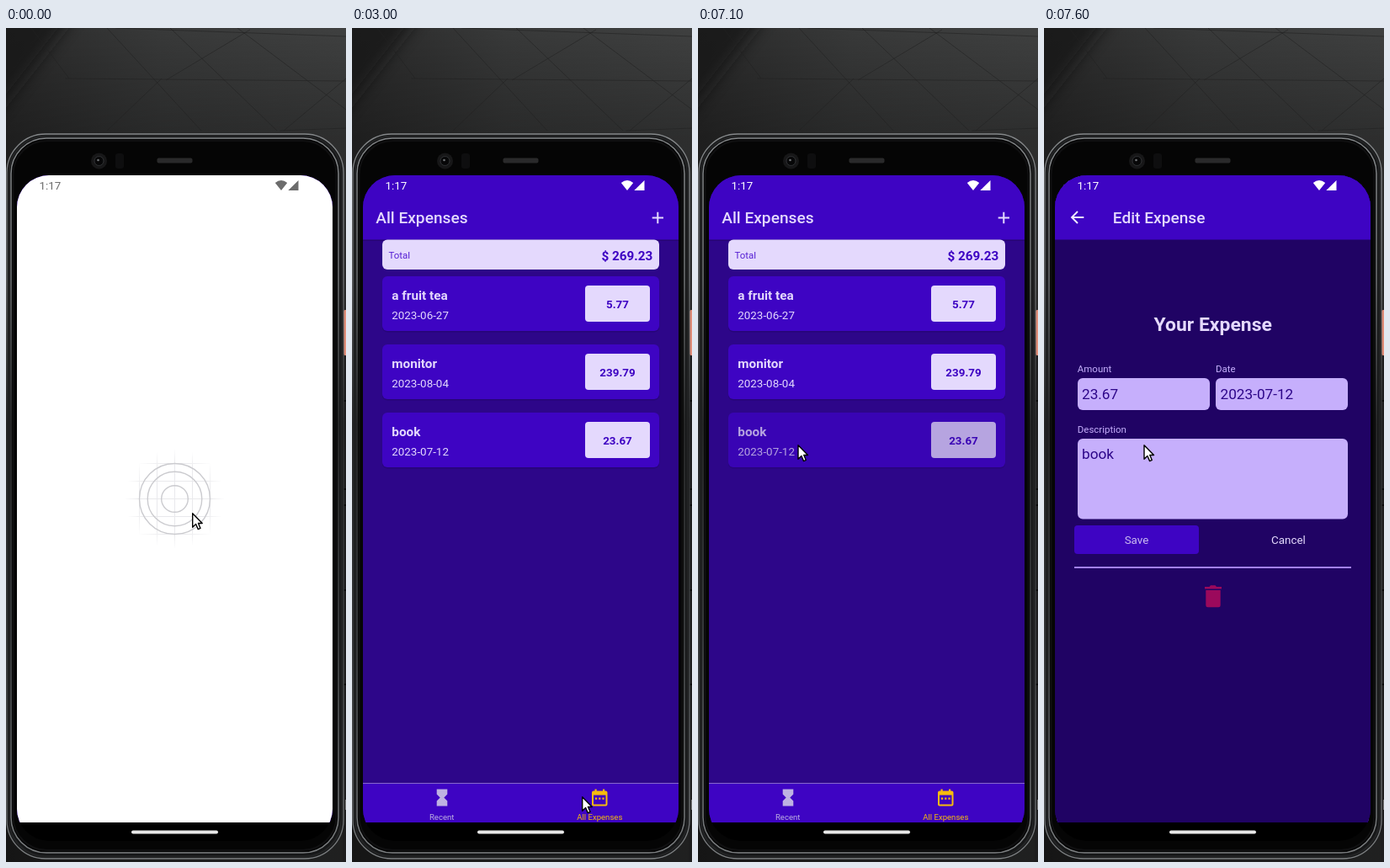
Animation, 404 px wide and 991 px high, one loop 8000 ms. Source, as an HTML page:

```html
<!DOCTYPE html>
<html lang="en">
<head>
<meta charset="utf-8">
<title>Expense tracker</title>
<style>
  html, body { margin: 0; width: 100%; height: 100%; overflow: hidden; background: #222; }
  svg { display: block; width: 404px; height: 991px; }
  text { font-family: Roboto, Arial, sans-serif; font-size: 13.4px; fill: #e4d9fd; white-space: pre; }
  .title { font-size: 19.13px; font-weight: 500; }
  .big { font-size: 22.96px; font-weight: 700; }
  .name { font-size: 15.3px; font-weight: 700; }
  .price { font-weight: 700; fill: #3e04c3; }
  .small { font-size: 11.48px; }
  .tab { font-size: 9.57px; }
  .field { font-size: 17.2px; fill: #2d0689; }
  .mid { text-anchor: middle; }
  .end { text-anchor: end; }
</style>
</head>
<body>
<svg viewBox="0 0 404 991">
  <defs>
    <linearGradient id="desk" x1="0" y1="0" x2="1" y2="0">
      <stop offset="0" stop-color="#2a2a2a"/><stop offset=".45" stop-color="#383939"/><stop offset="1" stop-color="#3f4040"/>
    </linearGradient>
    <linearGradient id="shade" x1="0" y1="0" x2="0" y2="1">
      <stop offset="0" stop-color="#000" stop-opacity="0"/><stop offset=".13" stop-color="#000" stop-opacity=".28"/>
      <stop offset=".5" stop-color="#000" stop-opacity=".45"/><stop offset="1" stop-color="#000" stop-opacity=".5"/>
    </linearGradient>
    <linearGradient id="rim" x1="0" y1="0" x2="0" y2="1">
      <stop offset="0" stop-color="#85888a"/><stop offset=".2" stop-color="#707375"/><stop offset=".4" stop-color="#2c2d2e"/>
      <stop offset=".7" stop-color="#45484a"/><stop offset="1" stop-color="#7d8082"/>
    </linearGradient>
    <radialGradient id="fade" gradientUnits="userSpaceOnUse" cx="200.5" cy="559.5" r="60">
      <stop offset=".7" stop-color="#fff"/><stop offset="1" stop-color="#000"/>
    </radialGradient>
    <mask id="soft" maskUnits="userSpaceOnUse" x="130" y="490" width="140" height="140">
      <rect x="130" y="490" width="140" height="140" fill="url(#fade)"/>
    </mask>
    <filter id="blur" x="-30%" y="-30%" width="160%" height="160%"><feGaussianBlur stdDeviation="9"/></filter>
    <clipPath id="glass"><rect x="13" y="175" width="375" height="791" rx="38"/></clipPath>
    <clipPath id="view"><rect x="13" y="175" width="375" height="769"/></clipPath>
  </defs>

  <!-- desk -->
  <rect width="404" height="991" fill="url(#desk)"/>
  <rect width="404" height="991" fill="url(#shade)"/>
  <path d="M-30-30H92L-30 125Z" fill="#141414" opacity=".75" filter="url(#blur)"/>
  <path d="M70 60L404 63M130 0L404 10M325 122L404 119M30 0L75 60M120 0L232 122M195 0L322 122M275 0L404 97M185 60L120 122M290 2L190 62M404 60L330 122"
    fill="none" stroke="#222" stroke-opacity=".6"/>
  <rect x="400" y="390" width="4" height="601" fill="#1d1d1e"/>
  <path d="M401 443h3M401 548h3M401 567h3M401 668h3M401 780h3" stroke="#080808" stroke-width="2"/>
  <path d="M403.5 917v12" stroke="#777"/>

  <!-- phone body -->
  <rect x="401" y="335" width="6" height="54" rx="2" fill="#e08d78"/>
  <rect x="1" y="126" width="400" height="861" rx="46" fill="#161718" stroke="url(#rim)" stroke-width="1.3"/>
  <rect x="3.5" y="128.5" width="395" height="856" rx="44" fill="none" stroke="#232425" stroke-width="2"/>
  <rect x="6" y="131" width="389" height="849" rx="42" fill="#030303" stroke="url(#rim)" stroke-width="1.5"/>
  <rect x="8.5" y="134" width="384" height="843" rx="40" fill="#050505" stroke="#101011" stroke-width="2"/>
  <circle cx="110.500" cy="158" r="9.500" fill="#171718"/>
  <circle cx="110.500" cy="158" r="5.500" fill="#070708" stroke="#303234"/>
  <circle cx="109.500" cy="157" r="1.300" fill="#73777a"/>
  <rect x="130" y="149" width="10" height="18" rx="3" fill="#0e0e0f"/>
  <rect x="179.500" y="154.500" width="42" height="6" rx="2" fill="#2a2a2b"/>

  <g clip-path="url(#glass)">
    <rect x="13" y="175" width="375" height="791"/>
    <g clip-path="url(#view)">
      <g id="home"></g>
      <g id="edit"></g>
      <g id="splash">
        <rect x="13" y="175" width="375" height="769" fill="#fff"/>
        <path id="grid" fill="none" stroke="#e9e9ec" mask="url(#soft)"/>
        <g fill="none" stroke="#cbcbcf" stroke-width="1.4">
          <circle cx="200.5" cy="559.5" r="42"/><circle cx="200.5" cy="559.5" r="32.3"/><circle cx="200.5" cy="559.5" r="15.8"/>
        </g>
      </g>
      <g id="status">
        <text x="39.5" y="192.300" style="fill:inherit">1:17</text>
        <path d="M319.800 184Q327 177.800 334.200 184L327 193ZM347.500 181V193H335.300Z"/>
      </g>
    </g>
    <rect x="149" y="953.500" width="103" height="4" rx="2" fill="#e8e8e8"/>
  </g>
  <path id="cursor" d="M.7.7V17.200L4.600 13.500L7.300 19.600L10 18.400L7.500 12.500H12.200Z" fill="#fff" stroke="#000" stroke-width="1.4" stroke-linejoin="round"/>
</svg>

<script>
const $ = id => document.getElementById(id);
const text = (x, y, cls, s, fill) => `<text x="${x}" y="${y}" class="${cls}"${fill ? ` style="fill:${fill}"` : ''}>${s}</text>`;
const box = (x, y, w, h, r, fill) => `<rect x="${x}" y="${y}" width="${w}" height="${h}" rx="${r}" fill="${fill}"/>`;
const show = (id, on) => $(id).style.display = on ? '' : 'none';

const MAIN = '#3e04c3', PALE = '#e4d9fd', LILAC = '#c6affc', GOLD = '#f7bc0c', IDLE = '#beb2e2';
const header = box(-20, 120, 440, 131.5, 0, MAIN) + box(-20, 251.5, 440, 1.5, 0, 'rgba(0,0,0,.16)');

function card(y, name, date, price, id) {
  return `<g id="${id}">` + box(36, y + 1, 329, 65.5, 6, 'rgba(20,0,70,.25)') + box(36, y, 329, 65, 6, MAIN) +
    text(47.3, y + 28, 'name', name) + text(47.3, y + 50.5, '', date) +
    box(277, y + 11, 77, 43, 4, PALE) + text(315.5, y + 38.2, 'price mid', price) + '</g>';
}

function summary(label, sum) {
  return box(36, 251.5, 329, 35.5, 6, PALE) + text(43.5, 274.2, 'small', label, '#5721d4') +
    text(357.3, 275.5, 'name end', sum, MAIN);
}

$('home').innerHTML =
  box(-20, 120, 440, 860, 0, '#2d0689') +
  `<g id="head">${header}<text id="title" class="title" x="28.2" y="232.3"></text>
    <path d="M356.700 225.500H370M363.300 218.800V232.200" stroke="${PALE}" stroke-width="2"/></g>
  <path id="spin" fill="none" stroke="${PALE}" stroke-width="3.2"/>
  <g id="recent">${summary('Last 7 Days', '$ 239.79')}${card(295, 'monitor', '2023-08-04', '239.79', 'r1')}</g>
  <g id="all">${summary('Total', '$ 269.23')}
    ${card(295, 'a fruit tea', '2023-06-27', '5.77', 'a1')}
    ${card(376, 'monitor', '2023-08-04', '239.79', 'a2')}
    ${card(457, 'book', '2023-07-12', '23.67', 'a3')}</g>` +
  box(-20, 897, 440, 90, 0, MAIN) +
  `<path d="M-20 897.500H420" stroke="#d8d8d8" stroke-width=".8" stroke-opacity=".6"/>
  <g id="tab1"><path d="M100.700 904.500H113.300V910.500L109.300 914.500L113.300 918.500V924.500H100.700V918.500L104.700 914.500L100.700 910.500Z"/>
    ${text(106.7, 941.2, 'tab mid', 'Recent', 'inherit')}</g>
  <g id="tab2"><path fill-rule="evenodd" d="M287 906.500H288.500V904.500H290.700V906.500H298V904.500H300.200V906.500H301.500Q303.500 906.500 303.500 908.500V922.500Q303.500 924.500 301.500 924.500H287Q285 924.500 285 922.500V908.500Q285 906.500 287 906.500ZM287 911.500V922.500H301.500V911.500ZM289 914.500h2.200v2.200h-2.200zM293.200 914.500h2.200v2.200h-2.200zM297.400 914.500h2.200v2.200h-2.200z"/>
    ${text(294.3, 941.2, 'tab mid', 'All Expenses', 'inherit')}</g>`;

$('edit').innerHTML =
  box(13, 175, 375, 769, 0, '#200364') + box(13, 175, 375, 76.5, 0, MAIN) +
  '<path d="M47.300 225H33.500M40 218L33 225L40 232" fill="none" stroke="#f0eafe" stroke-width="1.9"/>' +
  text(81.8, 232.3, 'title', 'Edit Expense') + text(200.7, 360, 'big mid', 'Your Expense') +
  text(39.8, 409.2, 'small', 'Amount', LILAC) + text(204, 409.2, 'small', 'Date', LILAC) +
  text(39.8, 481.2, 'small', 'Description', LILAC) +
  box(40, 416, 157, 38, 6, LILAC) + box(204, 416, 157, 38, 6, LILAC) + box(40, 488, 321, 95.5, 6, LILAC) +
  text(45, 441.3, 'field', '23.67') + text(209.5, 441.3, 'field', '2023-07-12') + text(45, 512, 'field', 'book') +
  box(36, 591, 148, 34, 4, MAIN) + text(110, 613.2, 'mid', 'Save', '#cbbaf0') + text(290.5, 613.2, 'mid', 'Cancel') +
  box(36, 640, 329, 2, 0, '#a281f0') +
  '<path d="M191 664H196.500L198 662.300H203.500L205 664H211V666.500H191ZM192.300 668H209.700V686Q209.700 688.300 207.400 688.300H194.600Q192.300 688.300 192.300 686Z" fill="#9b095c"/>';

$('grid').setAttribute('d', [-42, -21, 0, 21, 42].map(d =>
  `M${200.5 + d} 501V618M142 ${559.5 + d}H259`).join(''));

// time, x, y
const path = [
  [0, 221, 576], [100, 221, 576], [200, 220, 576.5], [1300, 220, 576.5], [1400, 201.5, 577], [1500, 193, 577.5],
  [1800, 193, 577.5], [1900, 190, 580], [2000, 197, 645], [2100, 222, 770], [2200, 250, 880], [2300, 264, 912],
  [2900, 264, 912], [3000, 273, 913], [3300, 300, 760], [3600, 338, 420], [3800, 347, 332],
  [3900, 347, 332], [4000, 338, 340], [4200, 250, 420], [4400, 125, 525], [4500, 86, 600], [4700, 108, 705], [4800, 130, 742],
  [4900, 134, 770], [5000, 132, 781], [5200, 125, 762], [5400, 122, 710.5], [5600, 121, 575], [5700, 120, 510],
  [5800, 119.5, 504], [5900, 119, 498], [6000, 118.3, 495], [8000, 118.3, 495]
];

function place(t) {
  const i = path.findIndex(p => p[0] > t), a = path[i - 1], b = path[i];
  const k = (t - a[0]) / (b[0] - a[0]);
  return [a[1] + (b[1] - a[1]) * k, a[2] + (b[2] - a[2]) * k];
}

function arc(from, sweep) {
  const at = deg => {
    const r = deg * Math.PI / 180;
    return `${200.5 + 12.7 * Math.sin(r)} ${563 - 12.7 * Math.cos(r)}`;
  };
  return `M${at(from)}A12.7 12.7 0 ${sweep > 180 ? 1 : 0} 1 ${at(from + sweep)}`;
}

const spins = [[15, 32], [45, 140], [80, 250], [190, 210]];
const zoom = (id, s) => $(id).setAttribute('transform', `translate(200.5 562) scale(${s}) translate(-200.5 -562)`);

function draw(now) {
  const t = Math.floor(now % 8000 / 100) * 100;
  const loading = t >= 500 && t < 900, all = t >= 3000;
  show('splash', t < 500);
  show('spin', loading);
  show('recent', t >= 900 && !all);
  show('all', all);
  show('edit', t >= 7500);
  if (loading) $('spin').setAttribute('d', arc(...spins[(t - 500) / 100]));
  $('head').setAttribute('transform', `translate(0 ${t <= 500 ? -22.5 : 0})`);
  $('title').textContent = all ? 'All Expenses' : 'Recent Expenses';
  $('tab1').style.fill = all ? IDLE : GOLD;
  $('tab2').style.fill = all ? GOLD : IDLE;
  $('a3').style.opacity = t >= 7100 && t < 7300 ? .75 : 1;
  $('status').style.fill = t < 500 ? '#6c6c6c' : '#fff';
  zoom('home', t < 7400 ? 1 : t < 7500 ? 1.075 : 1.13);
  zoom('edit', t < 7600 ? .98 : 1);
  $('cursor').setAttribute('transform', `translate(${place(t)})`);
}

const start = performance.now();
(function loop() {
  draw(performance.now() - start);
  requestAnimationFrame(loop);
})();
</script>
</body>
</html>
```
